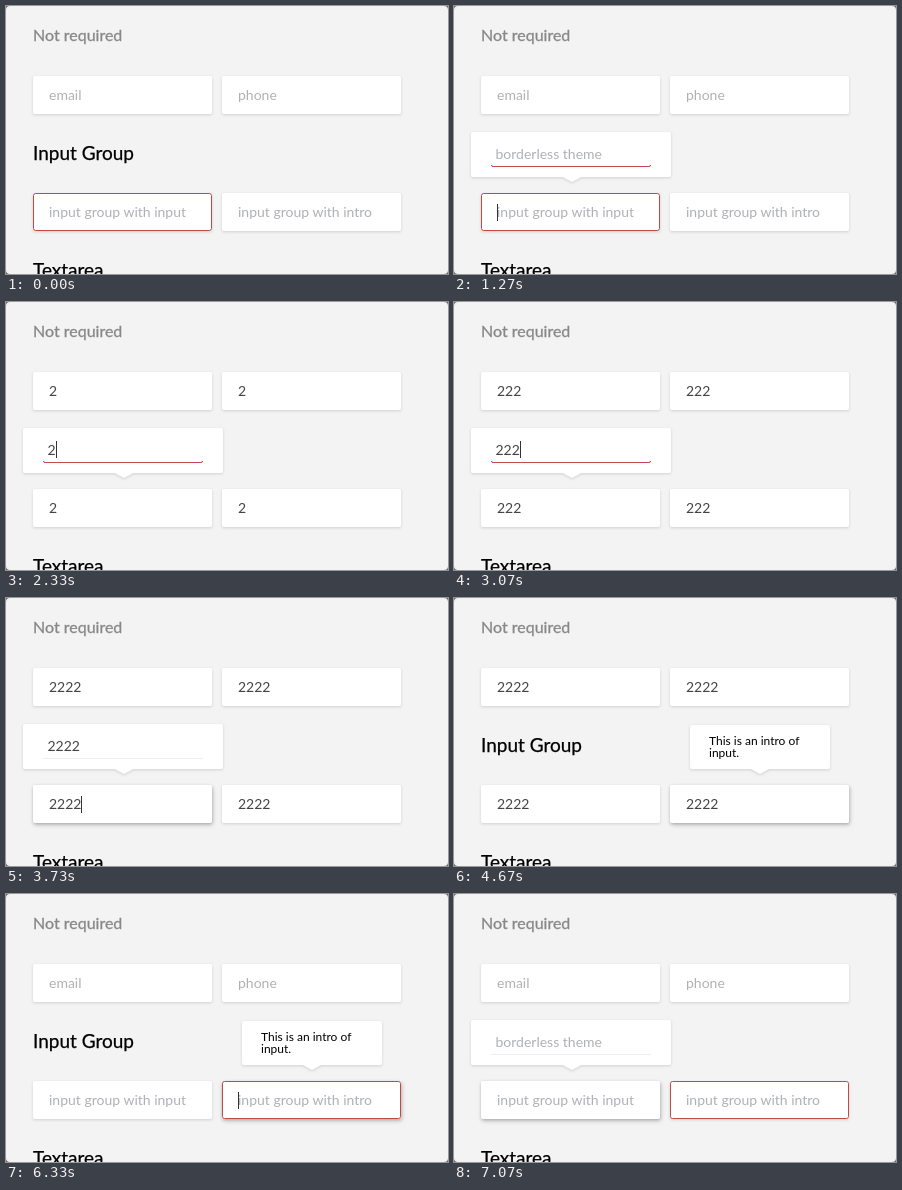
An HTML page that plays this animation: 442x268 px, repeating every 7.19 s.

```html
<!DOCTYPE html>
<html lang="en">
<head>
<meta charset="utf-8">
<style>
html, body { margin: 0; width: 100%; height: 100%; overflow: hidden; background: #666; }
svg { display: block; font: 14px Lato, sans-serif; }
.box { fill: #fff; filter: drop-shadow(0 1px 1.5px rgba(0, 0, 0, .14)); }
.focus { fill: #fff; filter: drop-shadow(1px 2px 2px rgba(0, 0, 0, .2)); }
.error { fill: none; stroke: #c4484a; }
.hint { fill: #b0b1b4; }
.value { fill: #444; }
.head { font-size: 19px; stroke: #000; stroke-width: .25; }
.caret { fill: #333; }
</style>
</head>
<body>
<svg width="442" height="268" viewBox="0 0 442 268">
  <rect width="442" height="268" rx="4" fill="#f3f3f3"/>
  <text x="27" y="35" font-size="16" fill="#888" stroke="#888" stroke-width=".3">Not required</text>
  <text class="head" x="27" y="154" id="title">Input Group</text>
  <text class="head" x="27" y="271">Textarea</text>
  <g id="fields"></g>
  <g id="inner">
    <path class="box" d="M19 126H215q2 0 2 2V169q0 2-2 2H127L118 176 109 171H19q-2 0-2-2V128q0-2 2-2Z"/>
    <path d="M37 160.5H197" stroke="#eee"/>
    <path id="line" d="M37.5 159q0 1.5 1.5 1.5H195q1.5 0 1.5-1.5" class="error"/>
    <text id="innerText" x="41.5" y="153"></text>
  </g>
  <g id="intro">
    <path class="box" d="M238 127H374q2 0 2 2V169q0 2-2 2H315L306 176 297 171H238q-2 0-2-2V129q0-2 2-2Z"/>
    <text font-size="12" x="255" y="147">This is an intro of<tspan x="255" y="159">input.</tspan></text>
  </g>
  <rect class="caret" id="caret" width="1" height="17"/>
</svg>
<script>
const LOOP = 7190, BLINK = 533, DIGIT = 8.12;
const $ = id => document.getElementById(id);
const show = (el, on) => el.setAttribute('opacity', +on);
const ramp = (t, from, len = 200) => Math.min(1, Math.max(0, (t - from) / len));

const fields = [
  [27, 70, 'email'], [216, 70, 'phone'],
  [27, 187, 'input group with input'], [216, 187, 'input group with intro']
].map(([x, y, hint]) => {
  const g = document.createElementNS('http://www.w3.org/2000/svg', 'g');
  g.innerHTML = `<rect class="box" x="${x}" y="${y}" width="179" height="38" rx="2"/>
    <rect class="focus" x="${x}" y="${y}" width="179" height="38" rx="2"/>
    <rect class="error" x="${x + .5}" y="${y + .5}" width="178" height="37" rx="2"/>
    <text x="${x + 16}" y="${y + 24}"></text>`;
  $('fields').append(g);
  const [, focus, error, text] = g.children;
  return { focus, error, text, hint };
});

// Where the caret goes, from each start time; text is its left edge.
const carets = [
  { at: 1200, x: 43, y: 198 },
  { at: 2070, x: 42, y: 139 },
  { at: 3530, x: 43, y: 198 },
  { at: 4130, x: 232, y: 198 },
  { at: 6400, x: 43, y: 198, blink: 6537 }
];
const keys = [2330, 2870, 3070, 3130];
const CLEAR = 5200;

function fill(el, value, hint) {
  el.textContent = value || hint;
  el.setAttribute('class', value ? 'value' : 'hint');
}

function draw(t) {
  const typed = t < CLEAR ? keys.filter(k => t >= k) : [];
  const value = '2'.repeat(typed.length);
  const innerOpen = t >= 1270 && t < 4130 || t >= 6400;

  for (const f of fields) {
    fill(f.text, value, f.hint);
    show(f.focus, 0);
    show(f.error, 0);
  }
  const [, , first, second] = fields;
  show(first.focus, ramp(t, 1270) - ramp(t, 2070) + ramp(t, 3530) - ramp(t, 4130) + ramp(t, 6400));
  show(second.focus, ramp(t, 4130) - ramp(t, 6400));
  show(first.error, 1 - ramp(t, 2070));
  show(second.error, ramp(t, CLEAR + 20));

  fill($('innerText'), value, 'borderless theme');
  show($('inner'), innerOpen);
  show($('line'), 1 - ramp(t, 3530));
  show($('intro'), t >= 4130 && t < 6400);
  show($('title'), !innerOpen);

  const c = carets.findLast(s => t >= s.at);
  if (!c || t < 1270) return show($('caret'), 0);
  const last = Math.max(c.blink || c.at, ...typed, t >= CLEAR && c.at < CLEAR ? CLEAR + 65 : 0);
  show($('caret'), t < last || Math.floor((t - last) / BLINK) % 2 === 0);
  $('caret').setAttribute('x', Math.round(c.x + value.length * DIGIT));
  $('caret').setAttribute('y', c.y);
}

const start = performance.now();
(function tick() {
  draw((performance.now() - start) % LOOP);
  requestAnimationFrame(tick);
})();
</script>
</body>
</html>
```
